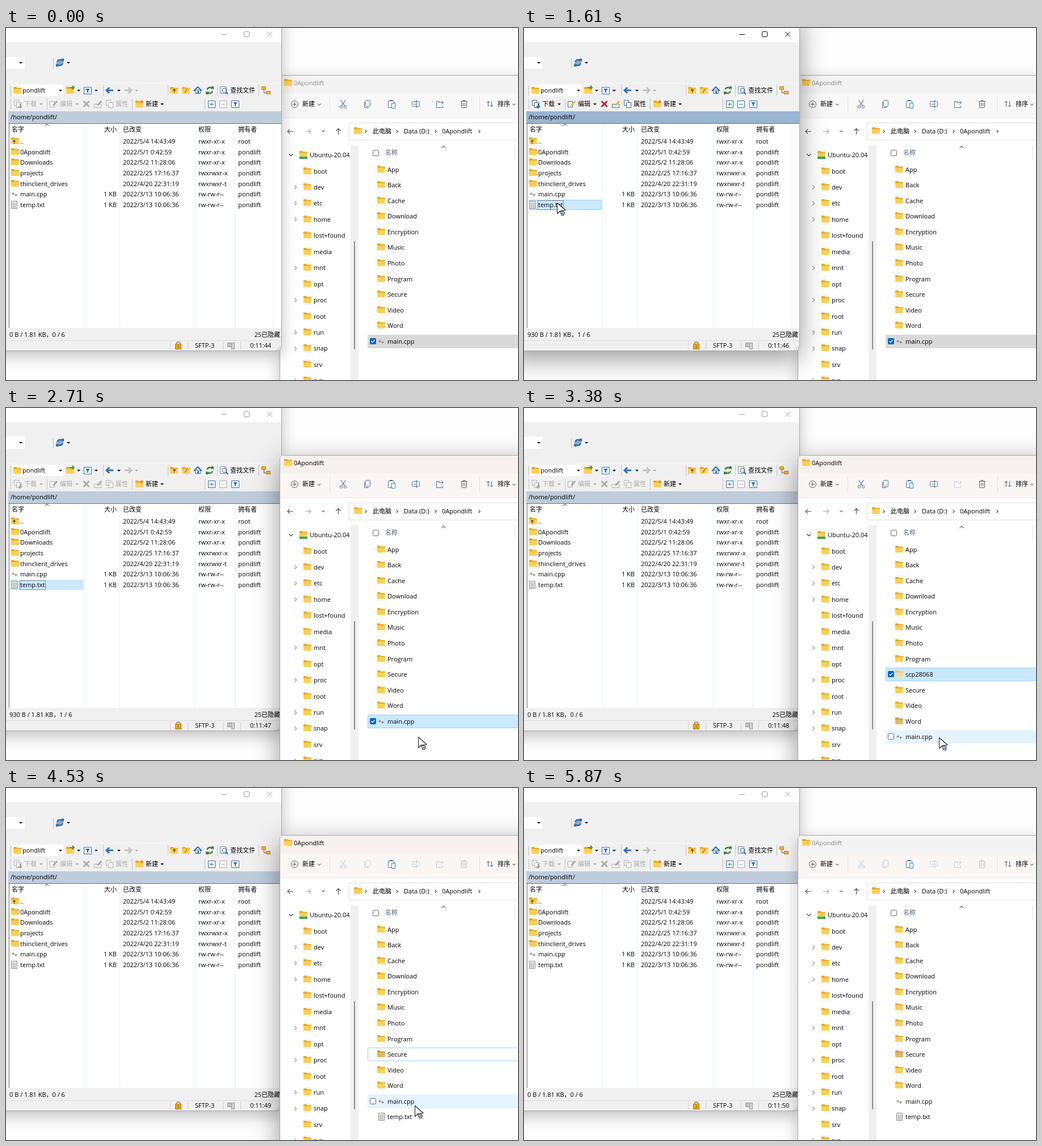
Recreate the animation shown at these times as an HTML page with a canvas. Size 902x621 px, loop 5.94 s.

```html
<!DOCTYPE html>
<html lang="zh-CN">
<head>
<meta charset="utf-8">
<title>File transfer by drag and drop</title>
<style>
html, body { margin: 0; width: 100%; height: 100%; overflow: hidden; background: #fff; }
canvas { display: block; width: 902px; height: 621px; }
</style>
</head>
<body>
<canvas id="stage" width="902" height="621"></canvas>
<script>
const g = document.getElementById('stage').getContext('2d');
const LOOP = 5940;
const USER = 'pondlift', FOLDER = '0Apondlift';
const FONT = '11px "Open Sans", "Noto Sans CJK SC", "Noto Sans CJK", sans-serif';
const BLUE = '#2f6ca8', GOLD = '#f0b62f', GREY = '#a8a8a8', INK = '#555';

// Moments at which the picture changes state
const ENTER = 70, PRESS = 1200, DRAG = 1680, DROP = 2570, SWITCH = 2640;
const TEMP_DIR = 3180, DONE = 4250, LEAVE = 5610, BLUR = 5870;

const easeOut = u => 1 - (1 - u) ** 1.5;
const smooth = u => u * u * (3 - 2 * u);
const START = { x: 838, y: 603 };
const MOVES = [
  { from: ENTER, to: 810, x: 90, y: 320, ease: easeOut },
  { from: 810, to: 1130, x: 58, y: 308, ease: easeOut },
  { from: 1760, to: 2295, x: 724, y: 580 },
  { from: DROP, to: 2920, x: 731, y: 581 },
  { from: 4110, to: 4530, x: 720, y: 560 },
  { from: 4860, to: 5140, x: 735, y: 584 },
  { from: 5400, to: LEAVE, x: 760, y: 625 }
];

// ---- drawing helpers ----
function rect(color, x, y, w, h) { g.fillStyle = color; g.fillRect(x, y, w, h); }
function frame(color, x, y, w, h, r = 0) {
  g.strokeStyle = color; g.lineWidth = 1;
  g.beginPath(); g.roundRect(x + .5, y + .5, w - 1, h - 1, r); g.stroke();
}
function box(fill, edge, x, y, w, h) { rect(fill, x, y, w, h); frame(edge, x, y, w, h); }
function round(color, x, y, w, h, r) {
  g.fillStyle = color; g.beginPath(); g.roundRect(x, y, w, h, r); g.fill();
}
function trace(p) {
  g.beginPath();
  for (let i = 0; i < p.length; i += 2) g.lineTo(p[i], p[i + 1]);
}
function line(color, width, ...p) { trace(p); g.strokeStyle = color; g.lineWidth = width; g.stroke(); }
function poly(color, ...p) { trace(p); g.closePath(); g.fillStyle = color; g.fill(); }
function ring(color, x, y, r, width = 1, a = 0, b = 2 * Math.PI) {
  g.strokeStyle = color; g.lineWidth = width; g.beginPath(); g.arc(x, y, r, a, b); g.stroke();
}
function disc(color, x, y, r) { g.fillStyle = color; g.beginPath(); g.arc(x, y, r, 0, 7); g.fill(); }
function text(s, x, cy, color = '#000', align = 'left') {
  g.fillStyle = color; g.textAlign = align; g.fillText(s, x, Math.round(cy) + 4);
}
function sep(x, y, h, color = '#c5c5c5') { rect(color, x, y, 1, h); }
function grip(x, y) { for (let i = 0; i < 16; i += 3) rect(GREY, x, y + i, 1, 2); }

// Directions count quarter turns clockwise from "right"
const RIGHT = 0, DOWN = 1, LEFT = 2, UP = 3;
function turned(x, y, dir, paint) {
  g.save(); g.translate(x, y); g.rotate(dir * Math.PI / 2); paint(); g.restore();
}
function chevron(x, y, dir, s = 2.5, color = '#666') {
  turned(x, y, dir, () => line(color, 1.1, -s / 2, -s, s / 2, 0, -s / 2, s));
}
function arrow(x, y, dir, len, color, width = 1.1, head = len * .8) {
  turned(x, y, dir, () => {
    line(color, width, -len, 0, len, 0);
    line(color, width, len - head, -head, len, 0, len - head, head);
  });
}
function drop(x, cy, color = '#000') { poly(color, x - 3, cy - 1, x + 3, cy - 1, x, cy + 2); }
function plus(x, y, r, color) { rect(color, x - r, y, 2 * r + 1, 1); rect(color, x, y - r, 1, 2 * r + 1); }
function cross(x, y, r, color, width) {
  for (const k of [-1, 1]) line(color, width, x - r, y - k * r, x + r, y + k * r);
}

// ---- icons, placed by their centre line ----
const FOLDER_TONES = { normal: ['#e9a91c', '#ffd053'], dull: ['#c99a45', '#e3b765'], pale: ['#d9cb84', '#eee0a6'] };
function folder(x, cy, tone = 'normal') {
  const [back, front] = FOLDER_TONES[tone], y = Math.round(cy) - 7;
  round(back, x, y, 6, 5, 1); round(back, x, y + 1.5, 14, 9, 1);
  round(front, x, y + 3.5, 14, 8.5, 1);
}
function page(x, cy) {
  const y = Math.round(cy) - 7;
  box('#f8f8f8', '#858585', x, y, 11, 14);
  for (let i = 3; i < 12; i += 2) rect('#a0a0a0', x + 2, y + i, 7, 1);
}
function cpp(x, cy) {
  for (const k of [0, 1]) plus(x + 3 + 5 * k, Math.round(cy) + 2 * k - 1, 2, '#777');
}
function sheets(x, cy, edge) { for (const d of [0, 4]) box('#fff', edge, x + d, cy - 7 + d, 9, 10); }
function pen(x, cy, color) { line(color, 3, x, cy + 3, x + 7, cy - 5); }
function cycle(x, cy, r, color) {
  for (const a of [0, Math.PI]) ring(color, x, cy, r, 2.4, a + .3, a + 2.6);
  poly(color, x + 2, cy - r - 2, x + 7, cy - r - 2, x + 7, cy - 1);
  poly(color, x - 2, cy + r + 2, x - 7, cy + r + 2, x - 7, cy + 1);
}
function funnel(x, cy, color) {
  box('#fff', color, x - 7, cy - 6, 14, 13);
  poly(color, x - 4, cy - 3, x + 4, cy - 3, x, cy + 2); rect(color, x - 1, cy, 2, 4);
}
function house(x, cy) {
  box('#f5f8fc', BLUE, x - 5, cy - 1, 10, 7);
  turned(x, cy - 6, UP, () => line(BLUE, 2, -7, -7, 0, 0, -7, 7));
  rect(BLUE, x - 1, cy + 1, 3, 5);
}
function checkbox(x, y, on) {
  round(on ? '#0067c0' : '#fff', x, y, 11, 11, 2);
  if (on) line('#fff', 1.2, x + 2.5, y + 5.5, x + 4.7, y + 7.7, x + 8.5, y + 3.5);
  else frame('#666', x, y, 11, 11, 2);
}
function windowBox(x, y, w, h, active) {
  g.save();
  g.shadowColor = `rgba(0,0,0,${active ? .4 : .24})`;
  g.shadowBlur = active ? 46 : 26; g.shadowOffsetY = active ? 13 : 9;
  round('#f0f0f0', x, y, w, h, 7);
  g.restore();
  frame(GREY, x, y, w, h, 7);
}

// ---- remote file window ----
function placeBar(cy) {
  rect('#fff', 0, 51, 33, 21); drop(26, 61);
  grip(83, 54); disc('#8fabc8', 95, 61, 6); cycle(95, 61, 5, BLUE); drop(110, 61);

  for (const x of [8, 285]) grip(x, cy - 8);
  for (const x of [171, 372, 445]) sep(x, cy - 10, 20);
  rect('#fff', 11, cy - 10, 90, 20);
  for (const x of [13, 106, 289, 310]) folder(x, cy + 1);
  text(USER, 29, cy);
  arrow(116, cy - 5, RIGHT, 4, '#4c9a3a', 2);
  funnel(144, cy, BLUE);
  arrow(183, cy, LEFT, 6, '#2873c4', 3, 5);
  arrow(215, cy, RIGHT, 6, '#c3c3c3', 3, 5);
  for (const x of [96, 128, 159, 199, 230]) drop(x, cy, x > 200 ? GREY : '#000');
  arrow(296.5, cy + 1, UP, 3, '#333'); line('#333', 1, 315, cy + 4, 319, cy - 2);
  house(338, cy);
  cycle(359, cy, 5, '#357b32');
  box('#fff', '#69879f', 377, cy - 7, 11, 13);
  ring('#235b8c', 385, cy, 4); line('#235b8c', 2, 388, cy + 3, 391, cy + 7);
  text('查找文件', 395, cy);
  line(INK, 1, 454.5, cy - 3, 454.5, cy + 4.5, 459, cy + 4.5);
  for (const k of [0, 8]) box(GOLD, '#b78315', 450 + k, cy - 7 + k, 8, 6);
}

function editBar(cy, on) {
  const pick = color => on ? color : GREY;
  const ink = pick('#000'), blue = pick(BLUE), gold = pick(GOLD);
  for (const x of [8, 350]) grip(x, cy - 8);
  for (const x of [72, 222]) sep(x, cy - 9, 19);
  sheets(14, cy, blue); arrow(25, cy + 3, DOWN, 4, blue, 2);
  box('#fff', blue, 77, cy - 5, 9, 11); pen(83, cy, gold);
  cross(141.5, cy, 5, pick('#c32121'), 2.6);
  box('#fff', blue, 155, cy, 13, 7); pen(161, cy, gold);
  sheets(176, cy, blue);
  folder(228, cy + 1); disc('#f08c25', 239, cy - 4, 2.5);
  text('下载', 32, cy, ink); text('编辑', 95, cy, ink); text('属性', 193, cy, ink); text('新建', 246, cy);
  drop(62, cy, ink); drop(125, cy, ink); drop(275, cy);
  box('#fff', BLUE, 356, cy - 6, 13, 13); plus(362, cy, 3, BLUE);
  box('#fff', blue, 376, cy - 6, 13, 13); rect(blue, 379, cy, 7, 1);
  funnel(404, cy, BLUE);
}

const REMOTE = [
  ['..', '', '2022/5/4 14:43:49', 'rwxr-xr-x', 'root'],
  [FOLDER, '', '2022/5/1 0:42:59', 'rwxr-xr-x', USER],
  ['Downloads', '', '2022/5/2 11:28:06', 'rwxr-xr-x', USER],
  ['projects', '', '2022/2/25 17:16:37', 'rwxrwxr-x', USER],
  ['thinclient_drives', '', '2022/4/20 22:31:19', 'rwxrwxr-t', USER],
  ['main.cpp', '1 KB', '2022/3/13 10:06:36', 'rw-rw-r--', USER],
  ['temp.txt', '1 KB', '2022/3/13 10:06:36', 'rw-rw-r--', USER]
];

function remoteRow([name, size, date, mode, owner], y, nameX) {
  text(name, nameX, y); text(size, 195, y, '#000', 'right');
  text(date, 206, y); text(mode, 339, y); text(owner, 409, y);
}

function remoteList(picked, cursor) {
  rect('#fff', 5, 168, 480, 361);
  rect('#737373', 4, 168, 481, 1); rect('#737373', 5, 168, 1, 361);
  for (const x of [138, 200, 333, 403, 470]) sep(x, 169, 360, '#e4f0f8');
  chevron(72, 171, UP, 3.5, '#777');
  remoteRow(['名字', '大小', '已改变', '权限', '拥有者'], 179, 10);

  const over = cursor && cursor.x < 137 && cursor.y > 303 && cursor.y < 320;
  if (picked || over) rect(picked ? '#cce8ff' : '#e5f3ff', 9, 303, 128, 18);
  if (over) frame('#99d1ff', 9, 303, 128, 18);
  REMOTE.forEach((row, i) => {
    const y = 200 + i * 18.67;
    (i < 5 ? folder : i === 5 ? cpp : page)(9, y);
    remoteRow(row, y, 25);
  });
  arrow(14.5, 201, UP, 3, '#333');
  if (picked) { g.setLineDash([1, 1]); frame('#333', 24, 304, 46, 17); g.setLineDash([]); }
}

function remoteStatus(t, picked) {
  text(picked ? '930 B / 1.81 KB，1 / 6' : '0 B / 1.81 KB，0 / 6', 6, 541);
  text('25已隐藏', 437.5, 541);
  rect('#dcdcdc', 0, 551, 485, 1);
  for (const x of [289, 320, 382, 413]) sep(x, 553, 15, '#d2d2d2');
  ring('#8f6815', 303.5, 557, 3.2, 1.2, Math.PI, 0);
  box('#e8a91d', '#a87516', 298, 557, 11, 10); rect('#6e4908', 303, 560, 1, 4);
  text('SFTP-3', 333, 560);
  box('#c4c4c4', '#949494', 390, 555, 9, 8); box('#d3d3d3', '#9b9b9b', 397, 555, 6, 12);
  text('0:11:' + (45 + Math.floor((t - 210) / 985)), 430, 560);
  for (let i = 0; i < 3; i++) for (let j = 0; j <= i; j++) rect(GREY, 482 - j * 3, 561 + i * 3, 1.5, 1.5);
}

function remoteWindow(t, cursor) {
  const active = t >= PRESS && t < SWITCH, picked = t >= PRESS && t < TEMP_DIR;
  const ink = active ? '#000' : '#999';
  windowBox(-30, -30, 516, 600, active);
  rect('#fff', 0, 0, 485, 25);
  rect(ink, 379, 11, 10, 1); frame(ink, 419, 6, 10, 10, 1); cross(464.5, 11, 4.5, ink, 1);
  rect('#f7f7f7', 0, 97, 485, 1);
  placeBar(110);
  editBar(134, active);
  rect(active ? '#99b4d1' : '#bfcddb', 4, 147, 481, 21);
  text('/home/' + USER + '/', 8, 157);
  remoteList(picked, cursor);
  remoteStatus(t, picked);
}

// ---- local file window ----
function commandBar(t) {
  const cy = 134, on = '#3f6f9f', off = '#b9d0df';
  const tone = t < DONE ? on : off, share = t < TEMP_DIR ? on : off, bin = t < DONE ? INK : '#bbb';
  const icons = [
    x => {
      for (const k of [-1, 1]) {
        line(tone, 1.1, x + 4.5 * k, cy - 7, x - 2.5 * k, cy + 3);
        ring(tone, x - 3.5 * k, cy + 5, 2.2);
      }
    },
    x => { frame(tone, x - 3, cy - 7, 9, 12, 2); line(tone, 1, x - 4.5, cy - 4, x - 4.5, cy + 6.5, x + 3, cy + 6.5); },
    x => { frame(on, x - 6, cy - 6, 11, 13, 1); rect(on, x - 3, cy - 7, 5, 2); box('#fff', '#1f87c9', x, cy - 2, 7, 10); },
    x => { frame(tone, x - 7, cy - 5, 14, 10, 2); rect(tone, x + 1, cy - 7, 1, 14); rect(tone, x - 4, cy, 4, 1); },
    x => {
      line(share, 1, x, cy - 4.5, x - 5.5, cy - 4.5, x - 5.5, cy + 6.5, x + 5.5, cy + 6.5, x + 5.5, cy + 3);
      arrow(x + 2, cy - 2.5, RIGHT, 4.5, share, 1);
    },
    x => {
      rect(bin, x - 6, cy - 5, 12, 1); frame(bin, x - 2, cy - 7, 4, 3); frame(bin, x - 5, cy - 5, 10, 12, 1);
      for (const k of [-2, 1]) rect(bin, x + k, cy - 2, 1, 6);
    }
  ];
  icons.forEach((icon, i) => icon(Math.round(593.5 + i * 42.7)));
  ring(INK, 508.5, cy + .5, 6); plus(508, cy, 3, INK);
  text('新建', 522, cy); text('排序', 866, cy);
  for (const x of [552, 895]) chevron(x, cy + 1, DOWN, 2.5, '#777');
  for (const x of [570, 834]) sep(x, 121, 27, '#e2e2e2');
  arrow(849.5, cy, UP, 5, INK, 1, 3); arrow(855.5, cy, DOWN, 5, on, 1, 3);
}

function addressBar(t) {
  const cy = 182;
  arrow(501, cy + .5, LEFT, 5, INK); arrow(532, cy + .5, RIGHT, 5, GREY);
  chevron(559, cy, DOWN); arrow(585.5, cy + .5, UP, 5, '#444');
  box('#fff', '#dedede', 604, 167, 302, 31);
  folder(613, cy);
  for (const x of [634, 689, 757]) chevron(x, cy + .5, RIGHT, 2.5, '#444');
  if (t < BLUR) chevron(834, cy + .5, RIGHT, 2.5, '#444');
  text('此电脑', 646, cy); text('Data (D:)', 701, cy); text(FOLDER, 768, cy);
}

function tree() {
  const names = 'boot dev etc home lost+found media mnt opt proc root run snap srv sys'.split(' ');
  const nested = 'dev etc home mnt proc run snap sys'.split(' ');
  chevron(502, 224, DOWN, 3.5, '#333');
  folder(517, 224); rect('#32a852', 517, 227, 14, 4);
  text('Ubuntu-20.04', 535, 224);
  names.forEach((name, i) => {
    const y = 252.5 + i * 28.45;
    if (nested.includes(name)) chevron(510, y, RIGHT, 3.5, '#888');
    folder(524, y); text(name, 542, y);
  });
  rect('#f0f0f0', 607, 207, 14, 414); rect('#8b8b8b', 613, 376, 2, 191);
}

function localList(t, cursor) {
  checkbox(646, 215, false); text('名称', 668, 220, '#4c6077');
  chevron(771, 210, UP, 3.5); sep(896, 207, 25, '#e2e2e2');
  const copying = t >= TEMP_DIR && t < DONE, done = t >= DONE;
  const names = 'App Back Cache Download Encryption Music Photo Program Secure Video Word main.cpp'.split(' ');
  if (copying) names.splice(8, 0, 'scp28068');
  if (done) names.push('temp.txt');
  const chosen = copying ? 'scp28068' : done ? '' : 'main.cpp';
  const dull = copying ? 'Word' : done ? 'Secure' : '';

  names.forEach((name, i) => {
    const y = Math.round(249.7 + i * 27.55), top = y - 12, picked = name === chosen;
    const over = t >= TEMP_DIR && cursor && cursor.y >= top && cursor.y < top + 27;
    if (picked) rect(t < SWITCH ? '#d9d9d9' : '#cce8ff', 637, top, 265, 24);
    else if (over) rect('#e5f3ff', 637, top, 265, 24);
    if ((picked && t >= SWITCH) || (name === 'Secure' && done && t < BLUR)) frame('#99d1ff', 637, top, 270, 24);
    if (picked || over) checkbox(641, top + 6, picked);
    if (name === 'main.cpp') cpp(655, y);
    else if (name === 'temp.txt') page(656, y);
    else folder(654, y, picked ? 'pale' : name === dull ? 'dull' : 'normal');
    text(name, 672, y);
  });
}

function localWindow(t, cursor) {
  const active = t >= SWITCH && t < BLUR;
  windowBox(482, 83, 460, 580, active);
  g.save();
  g.beginPath(); g.roundRect(483, 84, 460, 580, 6); g.clip();
  rect(active ? '#f6f0ee' : '#f3f3f3', 483, 84, 419, 31);
  rect(t >= SWITCH ? '#faf6f4' : '#f8f8f8', 483, 115, 419, 43);
  rect('#e6e6e6', 483, 158, 419, 1); rect('#fff', 483, 159, 419, 462);
  folder(490, 97); text(FOLDER, 507, 97, active ? '#000' : '#8b8b8b');
  commandBar(t); addressBar(t); tree(); localList(t, cursor);
  g.restore();
}

// ---- pointer ----
function cursorAt(t) {
  if (t < ENTER || t >= LEAVE) return null;
  let { x, y } = START;
  for (const m of MOVES) {
    const u = Math.min(1, Math.max(0, (t - m.from) / (m.to - m.from))), k = (m.ease || smooth)(u);
    x += (m.x - x) * k; y += (m.y - y) * k;
  }
  return { x, y };
}
function outlined(...p) {
  poly('#fff', ...p); trace(p); g.closePath();
  g.strokeStyle = '#222'; g.lineWidth = 1.1; g.stroke();
}
function drawCursor(t, c) {
  const pressed = (t >= PRESS && t < 1330) || (t >= DRAG && t < DROP);
  g.save(); g.translate(Math.round(c.x) + .5, Math.round(c.y) + .5); g.lineJoin = 'round';
  if (pressed) disc('rgba(255,238,70,.8)', 0, 0, 10.5);
  if (t >= 1930 && t < DROP) {
    outlined(0, 0, 0, 14, 3, 11.5, 5, 16, 7.5, 15, 5.5, 10.5, 10, 10);
    rect('#fff', 8, 15, 9, 9);
    g.setLineDash([2, 1]); frame('#222', 7.5, 14.5, 9, 9); g.setLineDash([]);
    plus(11.5, 18.5, 2, '#222');
  } else {
    outlined(0, 0, 0, 19, 5, 14.5, 14.5, 13);
    outlined(5, 15, 11, 15, 13, 18, 11, 22, 8, 22);
    disc('#4aa3dc', 9.5, 18.5, 2);
  }
  g.restore();
}

function draw(now) {
  const t = now % LOOP, cursor = cursorAt(t);
  g.font = FONT;
  rect('#fdfdfd', 0, 0, 902, 621);
  const order = t < SWITCH ? [localWindow, remoteWindow] : [remoteWindow, localWindow];
  for (const paint of order) paint(t, cursor);
  if (cursor) drawCursor(t, cursor);
}

const start = performance.now();
function tick() { draw(performance.now() - start); requestAnimationFrame(tick); }
tick();
</script>
</body>
</html>
```
